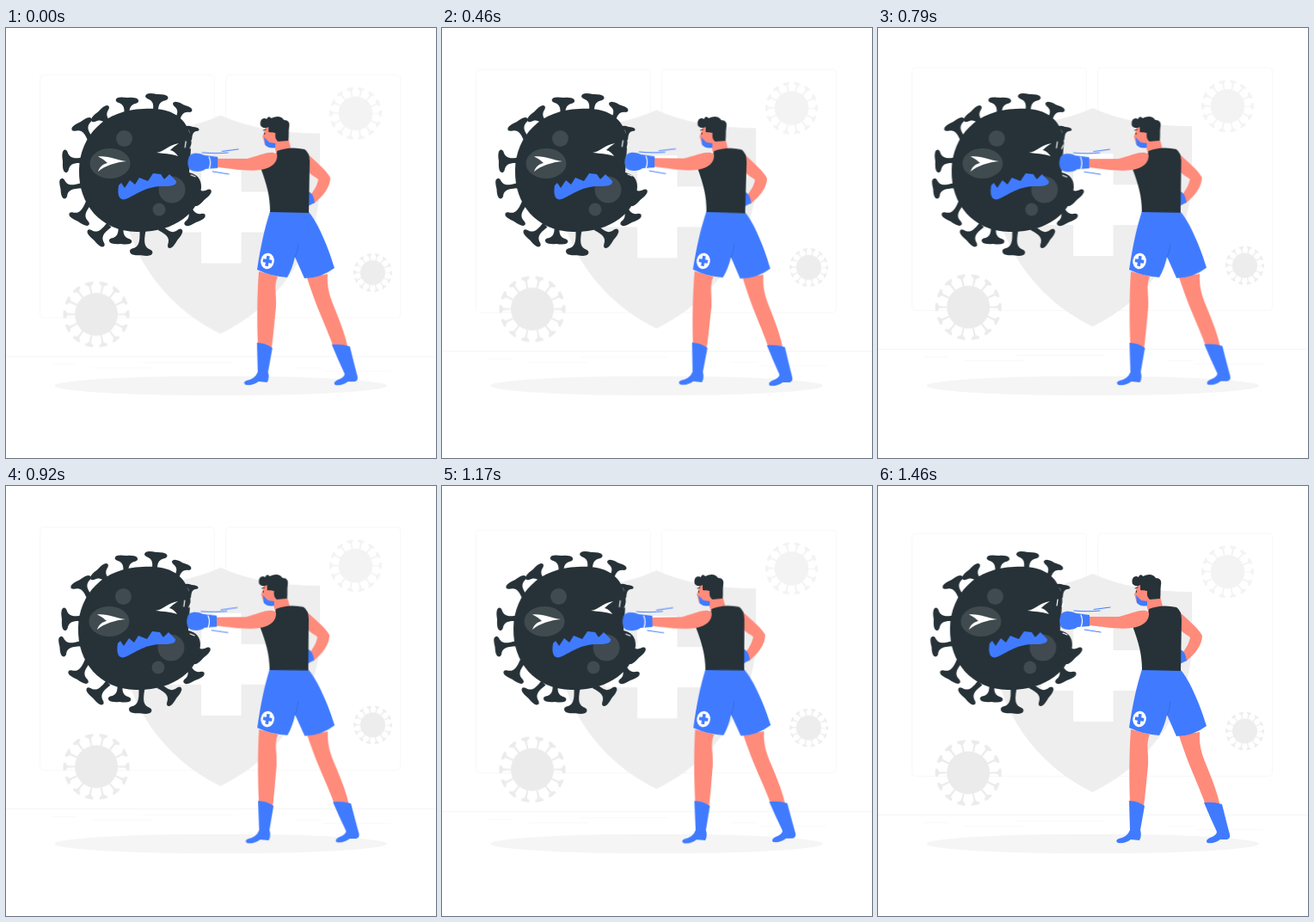
Write an HTML page without scripts that moves like this. It is 500x500 px and loops after 1500 ms.

```html
<!DOCTYPE html>
<html lang="en">
<head>
<meta charset="utf-8">
<title>Knockout punch</title>
<style>
  html, body { margin: 0; width: 100%; height: 100%; overflow: hidden; background: #fff; }
  svg { display: block; width: 100vw; height: 100vh; }

  .float, .shake, .sway { animation: 1.5s linear -40ms infinite; }
  .float { animation-name: float; }
  .shake { animation-name: shake; }
  .sway { animation-name: sway; transform-origin: 310px 259px; }

  @keyframes float { 50% { transform: translateY(-10px); } }
  @keyframes sway {
    25% { transform: rotate(1deg); }
    75% { transform: rotate(-1deg); }
  }
  @keyframes shake {
    0%, 100% { transform: translateX(-1.3px); }
    2.8%, 25%, 33.3% { transform: none; }
    29.2% { transform: translateX(-1px); }
    40.3% { transform: translateX(2px); }
    50%, 66.7%, 82.8% { transform: translateX(-4px); }
    59.4%, 75% { transform: translateX(4px); }
    90.6% { transform: translateX(2px); }
  }

  .dark { fill: #263238; }
  .blue { fill: #407bff; }
  .skin { fill: #ff8b7b; }
  .white { fill: #fff; }
  .line { fill: none; stroke-linecap: round; }
</style>
</head>
<body>
<svg viewBox="0 0 500 500">
  <defs>
    <g id="germ">
      <circle r="25" fill="currentColor"/>
      <g fill="none" stroke="currentColor">
        <circle r="30" stroke-width="11" pathLength="14" stroke-dasharray=".16 .84" stroke-dashoffset=".08"/>
        <circle r="35" stroke-width="2" pathLength="14" stroke-dasharray=".32 .68" stroke-dashoffset=".16"/>
        <circle r="37" stroke-width="3" pathLength="14" stroke-dasharray=".56 .44" stroke-dashoffset=".28"/>
      </g>
    </g>
    <path id="spike" d="M-3.5 24C-2 12-3 7-11 5Q-15 3-12 0Q-9-2 0-1Q9-2 12 0Q15 3 11 5C3 7 2 12 3.5 24Z"/>
  </defs>

  <g class="float">
    <g fill="#fff" stroke="#f8f8f8">
      <rect x="39.500" y="55" width="203" height="282.500" rx="4"/>
      <rect x="255.500" y="55" width="203" height="282.500" rx="4"/>
    </g>
    <path class="line" stroke="#f5f5f5" d="M0 382.500H500"/>
    <path class="line" stroke="#f9f9f9" d="M53 391.500H82M100 395.500H170M160 389.500H263M336 395.500H366M370 399.500H447"/>
    <path fill="#eee" d="M249.500 102Q295 123 365 123V180C365 258 314 325 249.500 356C185 325 134 258 134 180V123Q204 123 249.500 102Z"/>
    <path class="white" d="M227 155H273.500V191H311V238H273.500V274H227V238H190V191H227Z"/>
    <use href="#germ" color="#ebebeb" transform="translate(105 333.500)"/>
    <use href="#germ" color="#f3f3f3" transform="translate(406.500 99.800) scale(.79)"/>
    <use href="#germ" color="#ededed" transform="translate(426.500 285) scale(.58)"/>
  </g>

  <ellipse cx="249.500" cy="416" rx="193.500" ry="11.300" fill="#f5f5f5"/>

  <g class="shake">
    <g class="dark">
      <use href="#spike" transform="translate(141 82) rotate(2)"/>
      <use href="#spike" transform="translate(175.500 78) rotate(5)"/>
      <use href="#spike" transform="translate(206 90) rotate(22) scale(.9)"/>
      <use href="#spike" transform="translate(217 115.500) rotate(12) scale(.6)"/>
      <use href="#spike" transform="translate(108 98) rotate(-42)"/>
      <use href="#spike" transform="translate(87 110) rotate(-30)"/>
      <use href="#spike" transform="translate(67 155) rotate(-93)"/>
      <use href="#spike" transform="translate(64.500 187) rotate(-99) scale(.9 1)"/>
      <use href="#spike" transform="translate(84 224) rotate(-150)"/>
      <use href="#spike" transform="translate(103 246) rotate(-135)"/>
      <use href="#spike" transform="translate(133 250) rotate(182)"/>
      <use href="#spike" transform="translate(157 263) rotate(184) scale(1 1.150)"/>
      <use href="#spike" transform="translate(198.500 246) rotate(125)"/>
      <use href="#spike" transform="translate(220.500 225) rotate(155)"/>
      <use href="#spike" transform="translate(230 199) rotate(137)"/>
      <path d="M160 94C190 92 205 102 212 118Q217 128 215 140L213 168Q227 171 227 185C226 215 195 238 152 237C110 236 84 205 85 165C86 125 115 95 160 94Z"/>
    </g>
    <g fill="#fff" fill-opacity=".12">
      <ellipse cx="121" cy="157.500" rx="23.500" ry="17.500"/>
      <circle cx="137.500" cy="128.500" r="9.500"/>
      <circle cx="193" cy="188" r="15.500"/>
      <circle cx="178" cy="211" r="7.500"/>
    </g>
    <path class="white" d="M107 149.500C118 148 130 154 140 155C128 156 115 160 107 167C109 161 113 158 118 157C115 154 112 152 107 149.500ZM175 145C184 144 187 137 201 134C195 138 193 140 191 142C195 143 198 146 200 149C191 146 184 146 175 145Z"/>
    <path class="blue" d="M131 183L134 180L138 186L144 177L150 182L155 174L165 178L171 169L180 170L184 176L190 170L198 178C199 184 190 184 180 184C160 185 150 195 139 199C132 201 129 195 131 183Z"/>
  </g>

  <g class="sway">
    <path class="skin" d="M294 283L316 289C311 300 315 310 314 325C312 345 311 358 309 373L293 369C292 340 292 310 294 283ZM350 290L374 286C373 305 378 315 384 330C390 345 395 358 398 373L381 371C372 345 362 328 350 290Z"/>
    <path class="blue" d="M292 366Q302 366 310 372L305 400Q307 407 304 412L294 411Q288 416 279 415Q275 412 280 410Q290 408 293 400ZM379 368Q390 367 400 370Q405 390 409 405Q410 410 406 411L398 411Q392 416 383 415Q380 412 386 409Q394 406 394 402Q386 385 379 368Z"/>

    <path class="skin" d="M351 147C360 155 372 165 377 174C377 185 368 196 358 204L352 196C358 190 362 182 363 176C358 172 353 170 351 166Z"/>
    <path class="blue" d="M351 190Q357 191 359 203L351 207Z"/>

    <path class="blue" d="M307 213L352 214C362 225 375 255 382 279Q366 291 347 291L336 266Q333 280 327 290Q309 289 292 281C296 255 300 235 307 213Z"/>
    <path class="line" stroke="#3567d6" stroke-width=".8" d="M340 251Q339 260 336 267"/>
    <g transform="translate(304 271) rotate(10)">
      <ellipse class="white" rx="7.800" ry="9.300"/>
      <path class="blue" d="M-1.800-6H1.800V-2H5.200V2H1.800V6H-1.800V2H-5.200V-2H-1.800Z"/>
    </g>

    <path class="skin" d="M302 112L300 121L298 126L301 136L312 138L314 145L332 144L328 128L316 111Z"/>
    <path class="dark" d="M296 114C294 108 298 103 303 106C304 102 307 103 308 105C314 102 320 102 323 107C328 107 330 110 329 115C328 121 329 126 328 131L316 132Q312 129 313 122L305 121V115Q300 118 296 114Z"/>
    <ellipse class="skin" cx="309.500" cy="126.500" rx="3" ry="5"/>
    <path class="blue" d="M300 127L306 133L313 134V139Q306 141 301 136Z"/>
    <path class="line" stroke="#263238" d="M299 119L302 118M300.500 122V123.500"/>

    <path class="dark" d="M315 143Q330 137 347 141Q353 145 353 155L352 215L307 214C307 195 303 182 296 163Q312 160 315 143Z"/>
    <path class="skin" d="M315 147C308 141 294 149 280 152L245 152V162C265 164 280 167 296 165C308 163 316 157 315 147Z"/>
    <path class="blue" d="M212 152C213 145 222 144 230 148L246 150V163L232 164C228 168 216 168 213 164Q210 158 212 152Z"/>
    <path class="line" stroke="#fff" stroke-width="1.200" d="M236 150Q239 157 236 164M209 132L208 139M216 136L214 140M215 171L220 173"/>
    <path class="line" stroke="#407bff" d="M228 145Q245 146.500 258 145M251 143.500L270 141M240 167L259 170"/>
  </g>
</svg>
</body>
</html>
```
